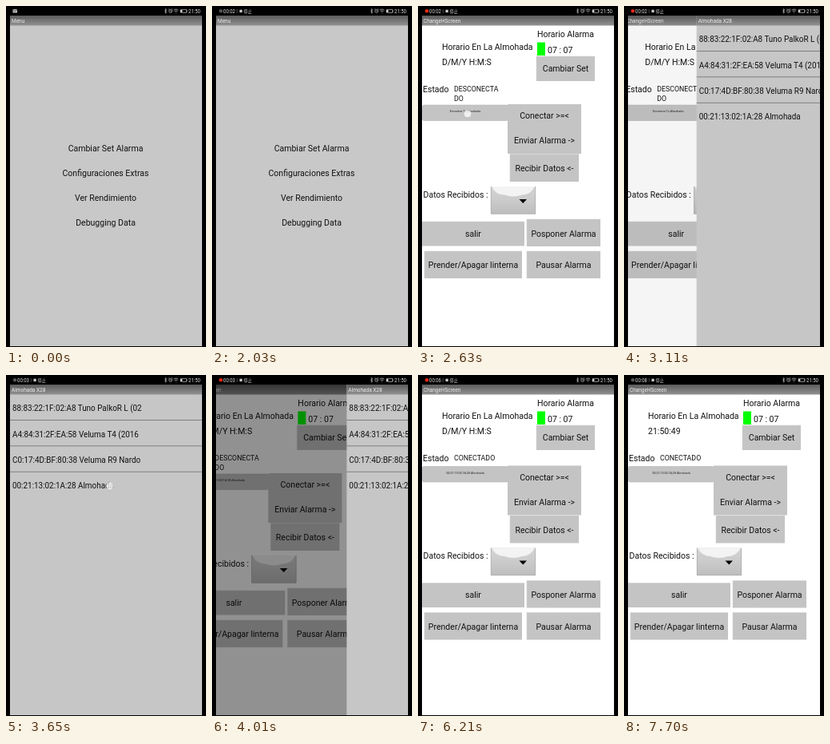
An HTML page for the animation above (8000 ms loop, 250 by 427 pixels).

```html
<!DOCTYPE html>
<html lang="es">
<head>
<meta charset="utf-8">
<title>Alarma</title>
<style>
  html, body { margin: 0; width: 100%; height: 100%; overflow: hidden; background: #000; }
  svg { display: block; width: 100%; height: 100%; }
  text { font-family: Roboto, "Noto Sans CJK SC", "Noto Sans CJK JP", sans-serif; }
</style>
</head>
<body>
<svg id="stage" viewBox="0 0 250 427">
  <defs>
    <linearGradient id="bar" x2="0" y2="1">
      <stop stop-color="#5c5c5c"/><stop offset="1" stop-color="#929292"/>
    </linearGradient>
    <linearGradient id="drop" x2="0" y2="1">
      <stop stop-color="#d4d4d4"/><stop offset=".5" stop-color="#cbcbcb"/><stop offset="1" stop-color="#bdbdbd"/>
    </linearGradient>
    <clipPath id="screen"><rect x="5" y="12" width="240" height="414"/></clipPath>
  </defs>
  <rect width="250" height="427"/>
  <g id="status"></g>
  <g clip-path="url(#screen)">
    <g id="menu"></g>
    <g id="alarm"></g>
    <g id="list"></g>
    <circle id="touch" r="4.8" fill="#fff" fill-opacity=".75" stroke="#999" stroke-opacity=".5" stroke-width=".7"/>
  </g>
</svg>
<script>
const LOOP = 8000, WIDTH = 240, PARALLAX = 53;
const OPEN_ALARM = 2063, OPEN_LIST = 2954, CLOSE_LIST = 3841;
const CONDENSE = 0.9; // the display is narrower than its native aspect
const $ = id => document.getElementById(id);

function add(parent, tag, attrs, content) {
  const node = document.createElementNS('http://www.w3.org/2000/svg', tag);
  for (const key in attrs) node.setAttribute(key, attrs[key]);
  if (content !== undefined) node.textContent = content;
  return parent.appendChild(node);
}
const group = parent => add(parent, 'g', {});
const rect = (parent, x, y, width, height, fill, extra) =>
  add(parent, 'rect', { x, y, width, height, fill, ...extra });
const label = (parent, x, y, content, size = 11.7, fill = '#111', anchor = 'start') =>
  add(parent, 'text', {
    transform: `translate(${x} ${y}) scale(${CONDENSE} 1)`,
    'font-size': size, fill, 'text-anchor': anchor
  }, content);
const line = (parent, d, width = 0.8, stroke = '#ccc') =>
  add(parent, 'path', { d, fill: 'none', stroke, 'stroke-width': width });

function button(parent, x, y, width, height, content, baseline) {
  rect(parent, x, y, width, height, '#c4c4c4');
  line(parent, `M${x} ${y + height}V${y}H${x + width}`, 0.6, '#d4d4d4');
  label(parent, x + width / 2, baseline, content, 11.7, '#111', 'middle');
}

function buildScreen(parent, title, background) {
  rect(parent, 5, 12, WIDTH, 415, background);
  const body = group(parent);
  rect(parent, 5, 12, WIDTH, 12.5, 'url(#bar)');
  label(parent, 7, 20.8, title, 7.2, '#eee');
  const shade = rect(parent, 5, 12, WIDTH, 415, '#000', { opacity: 0 });
  return { root: parent, body, shade };
}

function buildMenu() {
  const screen = buildScreen($('menu'), 'Menu', '#c8c8c8');
  ['Cambiar Set Alarma', 'Configuraciones Extras', 'Ver Rendimiento', 'Debugging Data']
    .forEach((item, i) => label(screen.body, 124.5, 181.8 + i * 31.2, item, 11.7, '#111', 'middle'));
  return screen;
}

function buildAlarm() {
  const screen = buildScreen($('alarm'), 'ChangeHScreen', '#fff');
  const top = screen.body;
  label(top, 149, 39, 'Horario Alarma');
  label(top, 30, 54.5, 'Horario En La Almohada');
  rect(top, 149, 45.5, 10, 16.5, '#0f0');
  label(top, 162, 58.5, '07 : 07');
  screen.clock = label(top, 30, 73.5, '');
  button(top, 148, 63, 73, 31, 'Cambiar Set', 81.5);
  label(top, 6, 108, 'Estado');
  screen.state = label(top, 45, 107, '', 9.8);
  screen.stateTail = label(top, 45, 118.5, 'DO', 9.8);

  const lower = screen.lower = group(top);
  rect(lower, 5.5, 124, 107, 19.5, '#c4c4c4', { rx: 2, stroke: '#aaa', 'stroke-width': 0.5 });
  screen.device = label(lower, 59, 133.3, '', 4.1, '#222', 'middle');
  rect(lower, 112, 123, 92, 62, '#c4c4c4');
  label(lower, 158, 141.3, 'Conectar >=<', 11.7, '#111', 'middle');
  label(lower, 158, 172.3, 'Enviar Alarma ->', 11.7, '#111', 'middle');
  button(lower, 115, 185.5, 86, 34.5, 'Recibir Datos <-', 207.3);
  label(lower, 6.5, 239.5, 'Datos Recibidos :');
  rect(lower, 91, 226, 56, 34.5, 'url(#drop)');
  add(lower, 'path', { d: 'M92 226h54q-6 11-16 10.5q-11 4-22 0q-11 0-16-10.5z', fill: '#f3f3f3' });
  line(lower, 'M91.3 226V260.2H146.7V226', 0.7, '#aaa');
  add(lower, 'path', { d: 'M126.5 242h9.5l-4.7 5z', fill: '#000' });
  button(lower, 5, 270, 128, 30.5, 'salir', 288.5);
  button(lower, 136, 267, 92, 34, 'Posponer Alarma', 288.5);
  button(lower, 8, 307, 122, 34, 'Prender/Apagar linterna', 328.3);
  button(lower, 136, 307, 92, 34, 'Pausar Alarma', 328.3);
  return screen;
}

function buildList() {
  const screen = buildScreen($('list'), 'Almohada X28', '#c6c6c6');
  ['88:83:22:1F:02:A8 Tuno PalkoR L (02', 'A4:84:31:2F:EA:58 Veluma T4 (2016',
   'C0:17:4D:BF:80:38 Veluma R9 Nardo', '00:21:13:02:1A:28 Almohada'].forEach((item, i) => {
    label(screen.body, 8, 45.2 + i * 32.3, item, 11);
    if (i < 3) rect(screen.body, 5, 56 + i * 32.4, WIDTH, 0.9, '#777');
  });
  return screen;
}

function buildStatus() {
  const bar = $('status');
  const mail = group(bar);
  rect(mail, 8.5, 4, 5.5, 4.5, '#bbb');
  line(mail, 'M8.5 4.3l2.75 2.2L14 4.3', 0.7, '#222');
  const recorder = group(bar);
  const dot = add(recorder, 'circle', { cx: 11, cy: 6.2, r: 2.2 });
  const timer = label(recorder, 14, 8.8, '', 6.7, '#ddd');
  line(recorder, 'M31.3 4V9', 0.6, '#777');
  rect(recorder, 34.5, 4.7, 3.2, 3.4, '#ccc');
  label(recorder, 39.5, 8.6, '停止', 5.8, '#ccc');

  line(bar, 'M198.3 4.8l2.6 3-1.4 1.3V3.4l1.4 1.3-2.6 3', 0.6);
  add(bar, 'circle', { cx: 205.7, cy: 6.4, r: 2, fill: 'none', stroke: '#ccc', 'stroke-width': 0.7 });
  line(bar, 'M203 4.5l1.4-1.2M208.4 4.5l-1.4-1.2M205.7 5.3v1.2h1', 0.6);
  line(bar, 'M209.7 5.2q2.8-2.5 5.6 0M210.8 6.8q1.7-1.4 3.4 0M212.1 8.4h.8', 0.8);
  rect(bar, 217.8, 4.4, 2.6, 4, '#ccc');
  line(bar, 'M220.4 4.4h5.2v4h-5.2M226.2 5.5v1.8', 0.7);
  label(bar, 228, 8.8, '21:50', 6.7, '#ddd');
  return { mail, recorder, dot, timer };
}

const menu = buildMenu(), alarm = buildAlarm(), list = buildList(), status = buildStatus();

// Even beats advance the recorder by a second, odd ones light its dot.
const BEATS = [60, 360, 860, 1360, 1850, 2270, 3170, 3800, 4130, 4560,
               4860, 5220, 5720, 6210, 6710, 7210, 7700];
const TAPS = [
  { from: 1610, to: 1970, x: 128, y: 179 },
  { from: 2570, to: 2870, x: 62, y: 135 },
  { from: 3470, to: 3770, x: 130, y: 139 },
  { from: 4590, to: 5160, x: 175, y: 141.5 }
];

const slide = (t, start) => {
  const p = Math.min(1, Math.max(0, (t - start) / 420));
  return 1 - (1 - p) ** 2.2;
};
const move = (node, x, y = 0) => node.setAttribute('transform', `translate(${x.toFixed(2)} ${y})`);
const show = (node, visible) => node.setAttribute('display', visible ? 'inline' : 'none');

// covered: 0 when the screen is in front, 1 when another one has replaced it
function recede(screen, covered) {
  move(screen.root, -PARALLAX * covered);
  screen.shade.setAttribute('opacity', 0.55 * covered);
}

function drawStatus(t) {
  const beat = BEATS.filter(b => b <= t).length - 1;
  show(status.mail, beat < 0);
  show(status.recorder, beat >= 0);
  status.dot.setAttribute('fill', beat % 2 ? '#f02818' : '#555');
  status.timer.textContent = '00:0' + Math.max(0, beat >> 1);
}

function draw(t) {
  drawStatus(t);

  const alarmIn = slide(t, OPEN_ALARM), listIn = slide(t, OPEN_LIST), listOut = slide(t, CLOSE_LIST);
  const closing = t >= CLOSE_LIST;
  recede(menu, alarmIn ** 6);
  recede(alarm, closing ? 1 - listOut ** 4 : listIn ** 6);
  if (t < OPEN_LIST) move(alarm.root, WIDTH * (1 - alarmIn));
  move(list.root, WIDTH * (closing ? listOut : 1 - listIn));

  const connected = t >= 5720;
  alarm.clock.textContent = t >= 7270 ? '21:50:49' : 'D/M/Y H:M:S';
  alarm.state.textContent = connected ? 'CONECTADO' : 'DESCONECTA';
  show(alarm.stateTail, !connected);
  move(alarm.lower, 0, connected ? -9.5 : 0);
  alarm.device.textContent = t < 3800 ? 'Encontrar Tu Almohada' : '00:21:13:02:1A:28 Almohada';

  const tap = TAPS.find(p => t >= p.from && t < p.to);
  show($('touch'), tap);
  if (tap) {
    move($('touch'), tap.x, tap.y);
    $('touch').setAttribute('opacity', Math.min(1, (tap.to - t) / 120));
  }
}

const begin = performance.now();
function tick() {
  draw((performance.now() - begin) % LOOP);
  requestAnimationFrame(tick);
}
tick();
</script>
</body>
</html>
```
